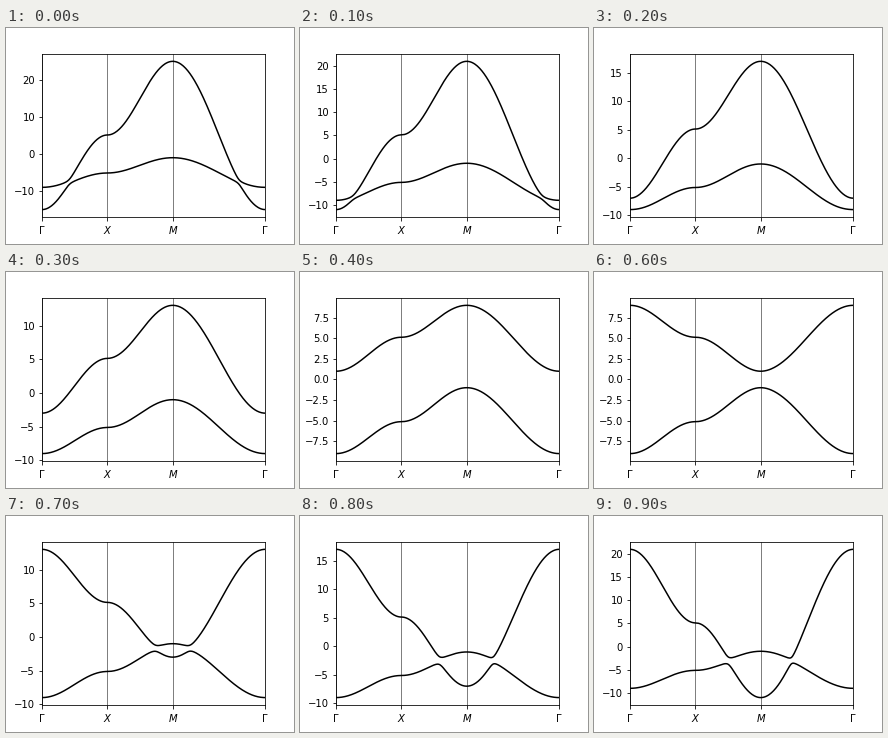
A matplotlib script that plays this animation: 288x216 px, repeating every 1000 ms.

```python
import numpy as np
import matplotlib.pyplot as plt
from matplotlib.animation import FuncAnimation

FRAMES = 10
DELTA, T_LOWER, T_MIX = 5.0, 1.0, 0.4
LABELS = [r"$\Gamma$", r"$X$", r"$M$", r"$\Gamma$"]

corners = np.pi * np.array([[0, 0], [1, 0], [1, 1], [0, 0]])
lengths = np.hypot(*np.diff(corners, axis=0).T) / (2 * np.pi)
nodes = np.concatenate([[0], np.cumsum(lengths)])
dist = np.linspace(0, nodes[-1], 301)
kx, ky = (np.interp(dist, nodes, corners[:, i]) for i in range(2))


def bands(t_upper):
    """Energies of the two-orbital checkerboard model along the path."""
    hop = 2 * (np.cos(kx) + np.cos(ky))
    upper = DELTA - t_upper * hop
    lower = -DELTA - T_LOWER * hop
    mix_squared = 4 * T_MIX**2 * (1 - np.cos(kx) * np.cos(ky))
    mean, half = (upper + lower) / 2, (upper - lower) / 2
    split = np.sqrt(half**2 + mix_squared)
    return np.array([mean - split, mean + split])


fig = plt.figure(figsize=(4, 3), dpi=72, facecolor="white")
fig.subplots_adjust(left=0.125, right=0.9, bottom=0.125, top=0.88)
ax = fig.add_subplot()


def draw(frame):
    energies = bands(5 - frame)
    low, high = energies.min(), energies.max()
    margin = 0.05 * (high - low)
    ax.clear()
    ax.set_xlim(nodes[0], nodes[-1])
    ax.set_ylim(low - margin, high + margin)
    ax.set_xticks(nodes, LABELS)
    for node in nodes:
        ax.axvline(node, color="k", linewidth=0.5)
    for energy in energies:
        ax.plot(dist, energy, color="k", linewidth=1.5)
    return ax.get_children()


anim = FuncAnimation(fig, draw, frames=FRAMES, interval=100,
                     init_func=lambda: draw(0), repeat=True, repeat_delay=0)
plt.show()
```
